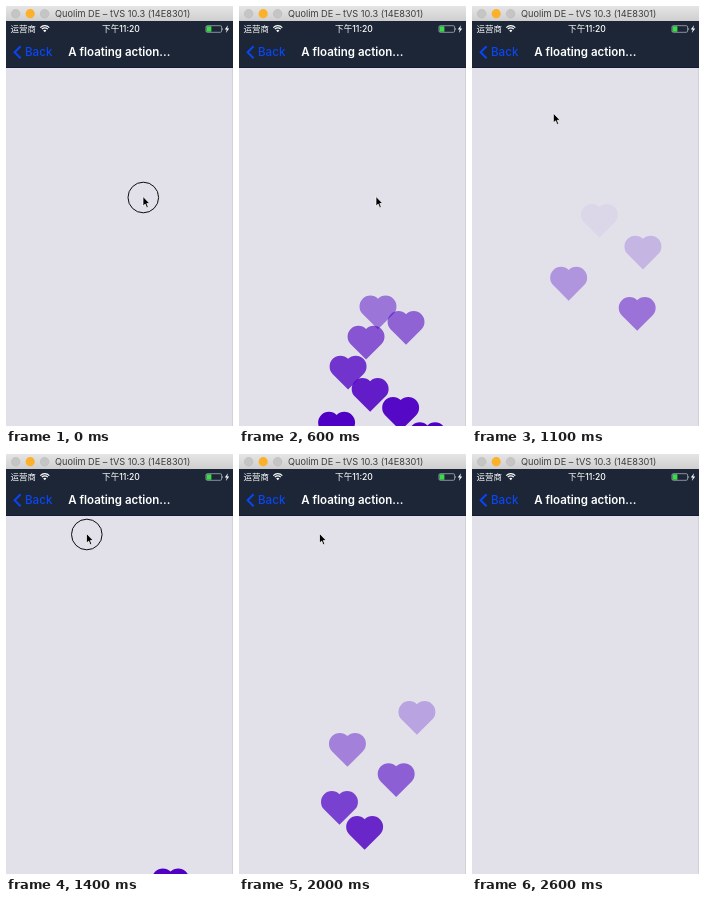
These frames come from a looping animation (227 by 420 pixels, 2700 ms). An HTML page:

```html
<!DOCTYPE html>
<html lang="en">
<head>
<meta charset="utf-8">
<title>Floating hearts</title>
<style>
  html, body { margin: 0; width: 100%; height: 100%; overflow: hidden; background: #e2e1ea; }
  svg { display: block; width: 227px; height: 420px; }
  text { font-family: Inter, "Noto Sans CJK SC", "Noto Sans CJK", sans-serif; }
</style>
</head>
<body>
<svg viewBox="0 0 227 420" xmlns="http://www.w3.org/2000/svg">
  <defs>
    <linearGradient id="bar" x2="0" y2="1">
      <stop stop-color="#e6e5e6"/><stop offset="1" stop-color="#d0cfd0"/>
    </linearGradient>
    <path id="heart" d="M0 17.2L-15.3 1.9A10.8 10.8 0 0 1 0 -13.4A10.8 10.8 0 0 1 15.3 1.9Z"/>
  </defs>
  <rect width="227" height="420" fill="#e2e1ea"/>
  <g id="hearts" fill="#5000c4"></g>
  <rect x="226" y="62" width="1" height="358" fill="#d2d1d8"/>

  <rect width="227" height="15" fill="url(#bar)"/>
  <g fill="#c6c5c6" stroke="#b5b4b5" stroke-width=".5">
    <circle cx="9.7" cy="7.7" r="4.3"/>
    <circle cx="24.2" cy="7.7" r="4.6" fill="#fdb02a" stroke="none"/>
    <circle cx="38.6" cy="7.7" r="4.3"/>
  </g>
  <text x="49" y="11.3" font-size="9.2" fill="#3c3c3c">Quolim DE – tVS 10.3 (14E8301)</text>

  <rect y="15" width="227" height="46" fill="#1c2636"/>
  <rect y="61" width="227" height="1" fill="#14183a"/>
  <g fill="#fff">
    <text x="4.5" y="26.3" font-size="8.5">运营商</text>
    <text x="115" y="26.3" font-size="8.6" font-weight="500" text-anchor="middle">下午11:20</text>
    <text x="62.3" y="50.3" font-size="11.5" font-weight="600">A floating action...</text>
    <path d="M37.2 24.6L38.8 26.2L40.4 24.6A2.3 2.3 0 0 0 37.2 24.6Z"/>
    <path d="M35.8 23.2A4.2 4.2 0 0 1 41.8 23.2M34.3 21.6A6.3 6.3 0 0 1 43.3 21.6" fill="none" stroke="#fff" stroke-width="1.2"/>
    <path d="M216.3 21.8q1.2 1.2 0 2.6zM222 19.3l-3.2 4.2h2l-1 3.4 3.4-4.4h-2z"/>
  </g>
  <rect x="200" y="19.7" width="15.6" height="6.6" rx="1.3" fill="none" stroke="#b9bdc4" stroke-width=".7"/>
  <rect x="200.6" y="20.3" width="4.8" height="5.4" rx=".5" fill="#3fd94f"/>
  <path d="M14.6 40.2L8.6 46.2L14.6 52.2" fill="none" stroke="#0a46f2" stroke-width="2"/>
  <text x="19" y="50.3" font-size="11.6" font-weight="500" fill="#0a46f2">Back</text>

  <g id="pointer">
    <circle id="ring" cx=".3" cy="1" r="15.3" fill="none" stroke="#0b0b0f"/>
    <path d="M0 0V9.6L2.2 7.6L3.7 11.2L5.3 10.5L3.8 7H6.7Z" fill="#000" stroke="#fff" stroke-width=".7"/>
  </g>
</svg>
<script>
const LOOP = 2700, STEP = 100;
const MID = 230, SWING = 210, FADE_END = 205;
const RATE = 0.00186; // radians of rise per ms
const $ = id => document.getElementById(id);
const lerp = (a, b, k) => a + (b - a) * k;

// A burst of taps at an even pace; each heart has a start x and a sideways drift.
function burst(first, gap, ...spots) {
  return spots.map(([x, drift], i) => {
    const el = document.createElementNS("http://www.w3.org/2000/svg", "use");
    el.setAttribute("href", "#heart");
    $("hearts").append(el);
    return { el, x, drift, birth: first + i * gap };
  });
}

const hearts = [
  ...burst(-45, 43, [151, -10], [176, -8], [126, 1]),
  ...burst(135, 81, [116, -8], [134, -4], [156, 10], [98, -1], [195, -25]),
  ...burst(1242, 84, [161, 12], [131, -18], [189, -29], [108, -8], [117, 11])
];

function show(el, on) {
  el.setAttribute("visibility", on ? "visible" : "hidden");
}

function move(el, x, y) {
  el.setAttribute("transform", `translate(${x.toFixed(2)} ${y.toFixed(2)})`);
}

function drawHeart({ el, x, drift, birth }, t) {
  const p = (t - birth) * RATE;
  const y = MID + SWING * Math.cos(p);
  const alpha = Math.min(1, (y - FADE_END) / SWING);
  const on = p > 0 && p < Math.PI && alpha > 0;
  show(el, on);
  if (!on) return;
  move(el, x + drift * p, y);
  el.setAttribute("opacity", alpha.toFixed(3));
}

function drawPointer(t) {
  const k = Math.max(0, Math.min(1, (t - 800) / 400));
  move($("pointer"), lerp(137, 80.5, 1 - (1 - k) ** 3), lerp(190.5, 79.5, k));
  show($("pointer"), t < 2500);
  show($("ring"), t <= 500 || (t >= 1200 && t <= 1600));
}

const start = performance.now();
function tick() {
  const now = (performance.now() - start) % LOOP;
  const t = Math.floor(now / STEP) * STEP;
  hearts.forEach(heart => drawHeart(heart, t));
  drawPointer(t);
  requestAnimationFrame(tick);
}
tick();
</script>
</body>
</html>
```
